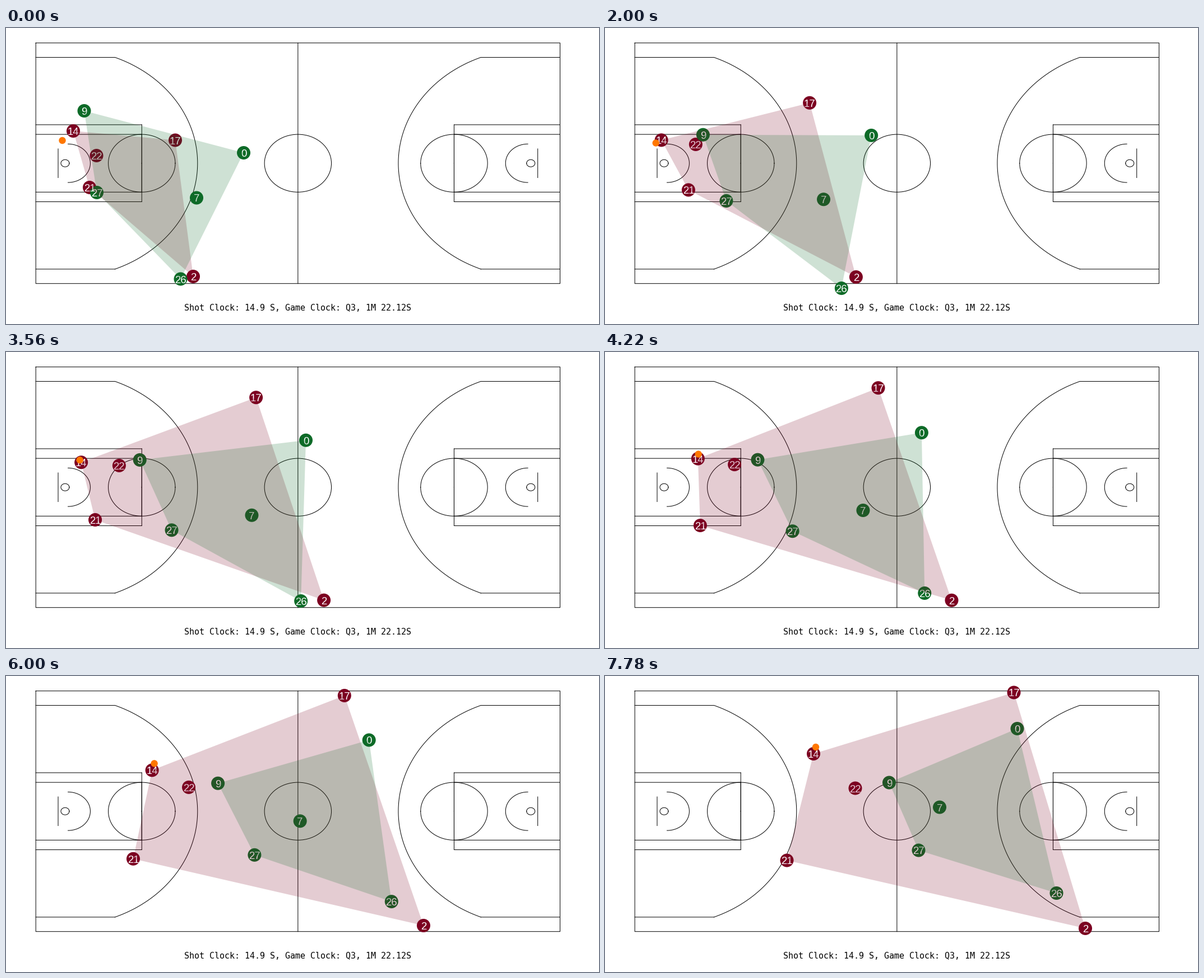
Write a matplotlib script that moves like this. It is 1058x529 px and loops after 8 s.

```python
import numpy as np
import matplotlib.pyplot as plt
from matplotlib.animation import FuncAnimation
from matplotlib.patches import Ellipse, Polygon

W, H, DPI = 1058, 529, 100
PX = 72 / DPI  # one pixel in points

LOOP_MS, TICK_MS = 8000, 40
POSES = 36  # the picture holds each pose for LOOP_MS / POSES

RED, GREEN, ORANGE = "#7c0021", "#0e6b28", "#ff7700"

# Court edges and pixels per foot
LEFT, RIGHT, TOP, BOTTOM = 53.2, 988.5, 26.7, 456.7
FX, FY = (RIGHT - LEFT) / 94, (BOTTOM - TOP) / 50
MID_X, MID_Y = (LEFT + RIGHT) / 2, (TOP + BOTTOM) / 2

# Each player runs smoothly through a point per key pose
KEYS = np.array([0, 5, 12, 23, 35])
RED_TEAM = {
    "14": [(120, 184), (104.5, 195), (106.5, 201.5), (212.5, 180), (372, 139)],
    "17": [(302, 200.5), (330, 168), (397, 108.5), (545, 46.5), (729.5, 29.5)],
    "22": [(161.5, 228), (156, 213), (173.5, 206), (276, 199.5), (446.5, 200.5)],
    "21": [(149, 285), (150, 289.5), (150.5, 290.5), (193, 321), (324.5, 329.5)],
    "2": [(334, 444), (385.5, 446), (499.5, 444), (684, 444.5), (857, 451)],
}
GREEN_TEAM = {
    "9": [(139.5, 148), (150, 183), (200, 191.5), (322.5, 192), (507, 190.5)],
    "0": [(424, 223), (448, 210.5), (499, 176.5), (606, 128), (735.5, 94)],
    "7": [(340, 303.5), (365, 309.5), (410.5, 301), (491.5, 271), (597, 234.5)],
    "27": [(162, 294), (182, 301.5), (248.5, 314), (388.5, 321), (559.5, 311.5)],
    "26": [(311.5, 448.5), (365, 466), (467.5, 459), (629, 414.5), (805.5, 388)],
}


def make_path(points):
    """Position at every pose, by cubic Hermite curves through the points."""
    p = np.array(points, float)
    slope = np.gradient(p, KEYS, axis=0, edge_order=2)
    t = np.arange(POSES)
    i = np.clip(np.searchsorted(KEYS, t, side="right") - 1, 0, len(KEYS) - 2)
    h = (KEYS[i + 1] - KEYS[i])[:, None]
    u = (t - KEYS[i])[:, None] / h
    return ((1 + 2 * u) * (1 - u) ** 2 * p[i] + u * (1 - u) ** 2 * h * slope[i]
            + u * u * (3 - 2 * u) * p[i + 1] + u * u * (u - 1) * h * slope[i + 1])


def convex_hull(points):
    pts = sorted(map(tuple, points))

    def half(seq):
        out = []
        for x, y in seq:
            while len(out) > 1:
                (ax, ay), (bx, by) = out[-2:]
                if (bx - ax) * (y - ay) - (by - ay) * (x - ax) > 0:
                    break
                out.pop()
            out.append((x, y))
        return out[:-1]

    return half(pts) + half(pts[::-1])


fig = plt.figure(figsize=(W / DPI, H / DPI), dpi=DPI, facecolor="white")
ax = fig.add_axes([0, 0, 1, 1])
ax.set_xlim(0, W)
ax.set_ylim(H, 0)
ax.axis("off")


def line(xs, ys):
    ax.plot(xs, ys, color="black", lw=PX, zorder=1, snap=False)


def draw_half(side):
    """One half of the court; side is 1 for left, -1 for right."""
    def seg(x0, y0, x1, y1):
        """Segment in feet from the baseline and from the long axis."""
        xs = MID_X + side * (np.array([x0, x1]) - 47) * FX
        line(xs, MID_Y + np.array([y0, y1]) * FY)

    def arc(cx, r, a0, a1):
        a = np.radians(np.linspace(a0, a1, 120))
        xs = MID_X + side * (cx + r * np.cos(a) - 47) * FX
        line(xs, MID_Y + r * FY * np.sin(a))

    hoop, foul, three = 5.25, 19, 23.75
    corner = np.arcsin(22 / three)
    corner_x = hoop + three * np.cos(corner)
    arc(hoop, three, -np.degrees(corner), np.degrees(corner))
    arc(hoop, 0.75, 0, 360)
    arc(5.77, 4, -90, 90)
    arc(foul, 6, 0, 360)
    seg(4, -3, 4, 3)
    for s in (-1, 1):
        seg(0, s * 22, corner_x, s * 22)
        for width in (6, 8):
            seg(0, s * width, foul, s * width)
            seg(foul, 0, foul, s * width)


line([LEFT, RIGHT, RIGHT, LEFT, LEFT], [TOP, TOP, BOTTOM, BOTTOM, TOP])
line([MID_X, MID_X], [TOP, BOTTOM])
ax.add_patch(Ellipse((MID_X, MID_Y), 12 * FX, 12 * FY, fill=False,
                     ec="black", lw=PX, zorder=1))
draw_half(1)
draw_half(-1)

ax.text(MID_X, 505, "Shot Clock: 14.9 S, Game Clock: Q3, 1M 22.12S",
        family="DejaVu Sans Mono", size=15 * PX, ha="center", va="baseline")


class Team:
    def __init__(self, players, color, layer):
        self.paths = {n: make_path(p) for n, p in players.items()}
        self.dots = [ax.add_patch(Ellipse((0, 0), 24, 24, fc=color, ec="none",
                                          zorder=layer)) for _ in players]
        self.labels = [ax.text(0, 0, n, color="white", family="Liberation Sans",
                               size=18.67 * PX, ha="center", va="baseline",
                               zorder=4) for n in players]
        self.hull = ax.add_patch(Polygon([(0, 0), (1, 0), (0, 1)], fc=color,
                                         ec="none", alpha=0.2, zorder=layer + 3))

    def move(self, pose):
        spots = [p[pose] for p in self.paths.values()]
        for (x, y), dot, label in zip(spots, self.dots, self.labels):
            dot.set_center((x, y))
            label.set_position((x, y + 7))
        self.hull.set_xy(convex_hull(spots))


red, green = Team(RED_TEAM, RED, 2), Team(GREEN_TEAM, GREEN, 3)
ball = ax.add_patch(Ellipse((0, 0), 12.4, 12.4, fc=ORANGE, ec="none", zorder=8))


def ball_spot(pose):
    """The loose ball drifts into the hand of player 14 and stays there."""
    u = min(pose / 22, 1)
    x, y = red.paths["14"][pose]
    return x - 19.5 + 23.5 * u, y + 17 - 29 * u


def update(tick):
    pose = ((tick + 1) * TICK_MS - 1) * POSES // LOOP_MS
    red.move(pose)
    green.move(pose)
    ball.set_center(ball_spot(pose))
    return []


anim = FuncAnimation(fig, update, frames=LOOP_MS // TICK_MS, interval=TICK_MS,
                     init_func=lambda: update(0), repeat=True, repeat_delay=0)
plt.show()
```
